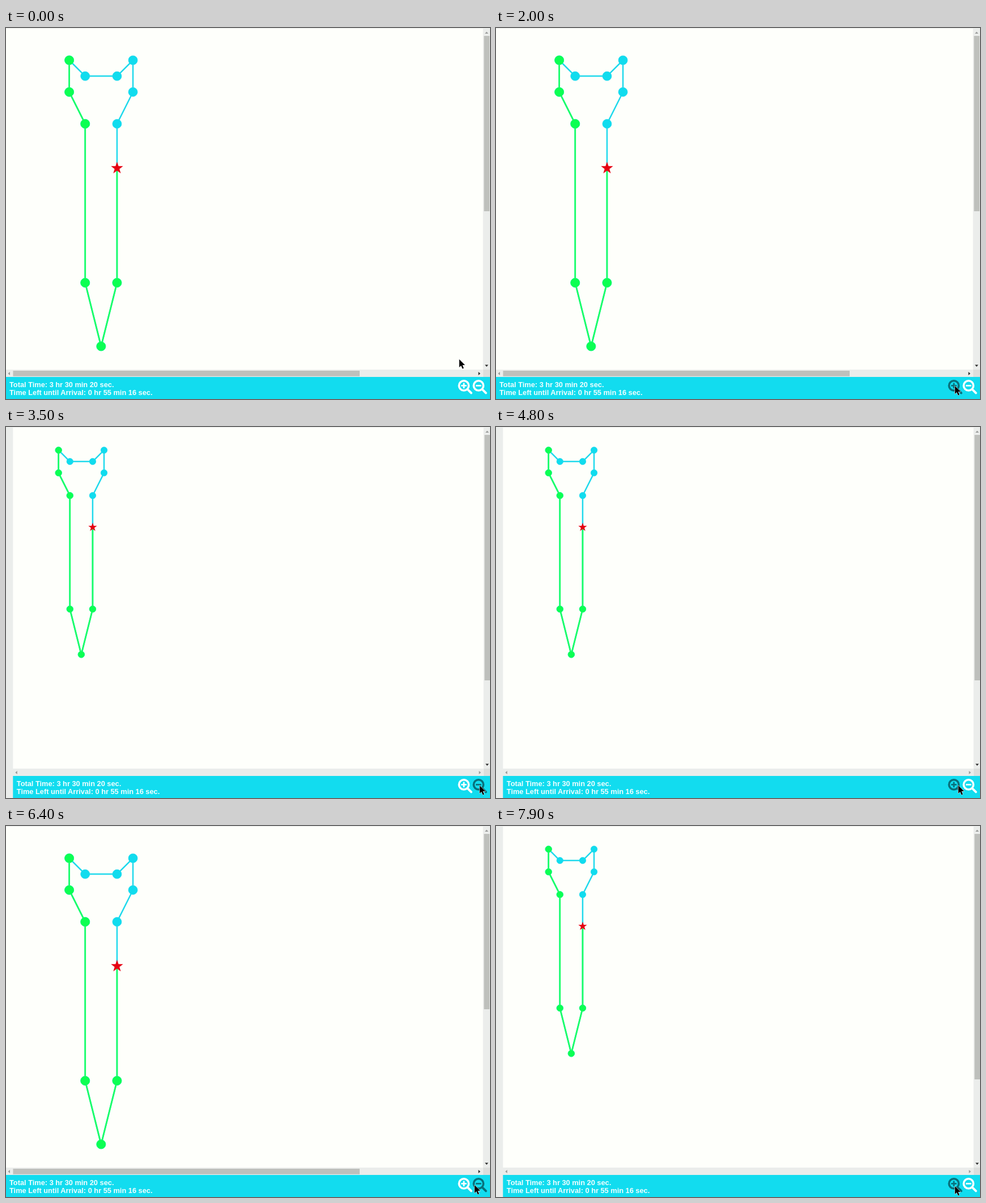
Recreate the animation shown at these times as an HTML page. Size 854 by 656 pixels, loop 8 s.

```html
<!DOCTYPE html>
<html lang="en">
<head>
<meta charset="utf-8">
<title>Route map zoom</title>
<style>
  html, body { margin: 0; width: 100%; height: 100%; overflow: hidden; background: #ebedeb; }
  #stage { display: block; width: 854px; height: 656px; }
  text { font: bold 12.8px "Liberation Sans", Arial, sans-serif; fill: #f2feff; }
  .blue { stroke: #1fd9ec; fill: #10dcee; }
  .green { stroke: #1cff68; fill: #0cff52; }
  .route path { fill: none; stroke-linejoin: round; }
  .route circle { stroke-opacity: .75; }
  .thumb { fill: #bec0bc; }
  .off { fill: #9a9c9a; }
  .on { fill: #2c2c2c; }
  .icon { color: #fff; }
  .icon.hover { color: #08707b; }
</style>
</head>
<body>
<svg id="stage" viewBox="0 0 854 656">
  <defs>
    <clipPath id="mapClip"><rect id="mapBox" y="1" width="842" height="603"/></clipPath>
    <g id="lens" fill="none" stroke="currentColor">
      <circle cx="208" cy="208" r="172" stroke-width="72"/>
      <path d="M362 362L468 468" stroke-width="78" stroke-linecap="round"/>
      <path d="M112 208H304" stroke-width="54"/>
    </g>
  </defs>
  <rect width="854" height="656" fill="#ebedeb"/>

  <g clip-path="url(#mapClip)">
    <rect width="854" height="604" fill="#fefffb"/>
    <g id="base" class="route blue"></g>
    <g id="done" class="route green"></g>
    <path id="star" fill="#e60012"/>
  </g>

  <g id="vbar">
    <rect x="842" y="604" width="13" height="13" fill="#dcdedc"/>
    <rect id="vthumb" class="thumb" x="843.4" y="14" width="9.8"/>
    <path class="off" d="M845 10L848 6.5L851 10Z"/>
    <path class="on" d="M845 595.5L848 599L851 595.5Z"/>
    <path id="rightArrow" d="M833.5 608L837 611L833.5 614Z"/>
  </g>
  <rect id="hthumb" class="thumb" x="12.5" y="606" width="0" height="9.8"/>

  <rect id="bar" y="617" width="854" height="39" fill="#12dcef"/>
  <g id="info">
    <path class="off" d="M7 608L3.5 611L7 614Z"/>
    <text x="6" y="634.5">Total Time: 3 hr 30 min 20 sec.</text>
    <text x="6" y="648.7">Time Left until Arrival: 0 hr 55 min 16 sec.</text>
  </g>

  <g id="plus" class="icon" transform="translate(797.5 622) scale(.05)">
    <use href="#lens"/>
    <path d="M208 112V304" stroke="currentColor" stroke-width="54"/>
  </g>
  <g id="minus" class="icon" transform="translate(823.4 622) scale(.05)"><use href="#lens"/></g>

  <path id="cursor" d="M0 0V14.2L3.3 11.2L5.7 16.6L8 15.6L5.7 10.3H10.2Z"
        fill="#000" stroke="#fff" stroke-width="1" paint-order="stroke"/>
</svg>

<script>
const LOOP = 8000, UNIT = 4.0145;
const route = [[4,2],[5,3],[7,3],[8,2],[8,4],[7,6],[7,16],[6,20],[5,16],[5,6],[4,4]];
const here = [7, 8.79];

// time, zoom of the map, zoom of the travelled part (it is redrawn late)
const views = [
  [0, 7, 7], [2800, 6, 7], [3000, 6, 6], [3500, 5, 5], [3700, 4, 5], [4000, 4, 4],
  [4800, 5, 5], [5000, 6, 6], [5200, 7, 6], [5500, 8, 7], [5600, 8, 8],
  [6400, 7, 7], [6700, 6, 6], [6800, 5, 6], [7000, 5, 5]
];

// time, x, y, hovered icon
const moves = [
  [0, 799, 585, ""], [600, 805, 630, "plus"], [700, 811, 629, "plus"], [900, 809, 628, "plus"],
  [1100, 836, 630, "minus"], [1400, 824, 630, "minus"], [1500, 811, 630, "plus"],
  [1600, 830, 630, "minus"], [1700, 841, 630, "minus"], [1900, 820, 631, "plus"],
  [2000, 809, 632, "plus"], [2100, 812, 632, "plus"], [2200, 823, 633, "plus"],
  [2300, 833, 633, "minus"], [2400, 836, 634, "minus"], [2900, 835, 633, "minus"],
  [4300, 824, 633, "minus"], [4400, 815, 633, "plus"], [6000, 821, 633, "plus"],
  [6100, 826, 634, "minus"], [7600, 817, 635, "plus"], [7800, 812, 636, "plus"],
  [7900, 809, 636, "plus"]
];

const $ = id => document.getElementById(id);
const at = (list, t) => list.findLast(row => row[0] <= t);
const set = (id, attrs) => { for (const k in attrs) $(id).setAttribute(k, attrs[k]); };

function drawRoute(id, nodes, line, zoom, dx, width) {
  const u = zoom * UNIT;
  const place = ([x, y]) => [x * u - .8 + dx, y * u + .8];
  const path = line.map(p => place(p).map(v => v.toFixed(2))).join("L");
  const dots = nodes.map(p => {
    const [x, y] = place(p);
    return `<circle cx="${x}" cy="${y}" r="${u * .285}"/>`;
  }).join("");
  $(id).innerHTML = `<path d="M${path}" stroke-width="${width}"/>${dots}`;
}

function drawStar(zoom, dx) {
  const u = zoom * UNIT, points = [];
  for (let i = 0; i < 10; i++) {
    const r = u * (i % 2 ? .16 : .4), a = (i / 5 - .5) * Math.PI;
    points.push([here[0] * u - .8 + dx + r * Math.cos(a), here[1] * u + .8 + r * Math.sin(a)]);
  }
  set("star", { d: "M" + points.join("L") + "Z" });
}

function drawView([, zoom, doneZoom]) {
  const narrow = zoom < 6, dx = narrow ? 13.2 : 0, left = narrow ? 12.3 : 0;
  drawRoute("base", route, [...route, route[0]], zoom, dx, 2.5);
  drawRoute("done", [route[0], ...route.slice(6)], [here, ...route.slice(6), route[0]], doneZoom, dx, 2.8);
  drawStar(zoom, dx);
  set("mapBox", { x: left, width: (narrow ? 842.6 : 841.6) - left });
  set("bar", { x: left });
  set("info", { transform: `translate(${narrow ? 12.8 : 0})` });
  set("vbar", { transform: `translate(${narrow ? 1 : 0})` });
  set("vthumb", { height: 310 * 7 / zoom });
  set("hthumb", { width: narrow ? 0 : 611.5 * 7 / zoom });
  set("rightArrow", { class: narrow ? "off" : "on" });
}

function drawCursor([, x, y, hover]) {
  set("cursor", { transform: `translate(${x + .7} ${y + .8})` });
  for (const id of ["plus", "minus"]) $(id).classList.toggle("hover", id === hover);
}

let view, move;
function tick() {
  const t = performance.now() % LOOP;
  const v = at(views, t), m = at(moves, t);
  if (v !== view) drawView(view = v);
  if (m !== move) drawCursor(move = m);
  requestAnimationFrame(tick);
}
tick();
</script>
</body>
</html>
```
